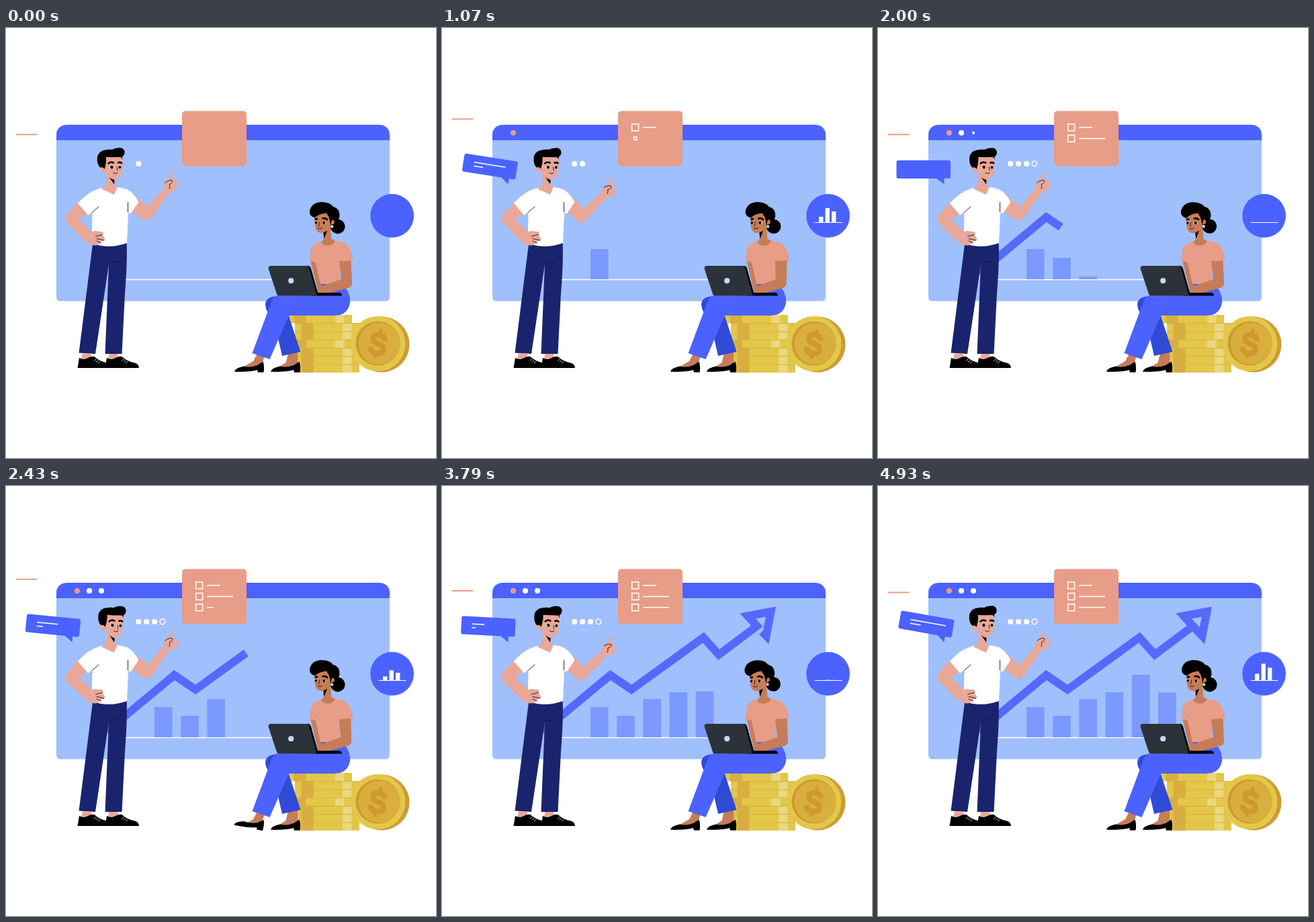
An HTML page that plays this animation: 640x640 px, repeating every 5 s.

```html
<!DOCTYPE html>
<html lang="en">
<head>
<meta charset="utf-8">
<title>Growth presentation</title>
<style>
html, body { margin: 0; width: 100%; height: 100%; overflow: hidden; background: #fff; }
svg { display: block; width: 100vw; height: 100vh; }
.ln { fill: none; stroke: #fff; stroke-width: 1.5; }
.ink { fill: none; stroke: #16161c; stroke-width: .9; stroke-linecap: round; }
.brow { fill: none; stroke: #000; stroke-width: 2.6; stroke-linecap: round; }
.blue { fill: #4c62ff; }
.skin { fill: #e9a798; }
.tan { fill: #c67c58; }
.white { fill: #fff; }
.pink { fill: #e79d87; }
</style>
</head>
<body>
<svg viewBox="0 0 640 640">
  <defs>
    <path id="pump" d="M340 511.5Q341 506 354 503.5Q364 506 374 502L382.500 496.500Q385 503 383.500 512.500H375L374 509Q361 512.500 340 511.500Z"/>
  </defs>

  <!-- window -->
  <rect x="75" y="150" width="496" height="256.500" rx="5.500" fill="#a0bffd"/>
  <path class="blue" d="M75 167V161Q75 144 92 144H554Q571 144 571 161V167Z"/>
  <path class="ln" d="M170 374.500H400"/>
  <g id="bars" fill="#7b99fe"></g>
  <path id="arrow" fill="none" stroke="#5669fd" stroke-width="12" stroke-miterlimit="6"
    d="M150 365L250.500 281.500L282 303L389 225.500L412 251L468.700 208.500L455 193.500L489.500 187L482.500 223L468.700 208.500"/>
  <g id="dots"></g>
  <rect class="pink" x="262" y="123.500" width="96" height="82" rx="5"/>
  <g id="list"></g>

  <circle class="blue" cx="574.600" cy="279.500" r="32.400"/>
  <g id="mini" class="white"></g>

  <path id="dash" stroke="#e79d87" stroke-width="2" d="M14.500 0H46.500"/>
  <g id="bubble">
    <path class="blue" d="M30.500 197H105Q108 197 108 200V221Q108 224 105 224H98.500V232.500L87 224H30.500Q27.500 224 27.500 221V200Q27.500 197 30.500 197Z"/>
    <path id="speech" class="ln"/>
  </g>

  <!-- coins -->
  <g id="stack"></g>
  <circle cx="559" cy="471" r="41.500" fill="#d09a35"/>
  <circle cx="553.500" cy="470" r="41" fill="#e2c748"/>
  <circle cx="553.500" cy="469.500" r="33" fill="#cf9832"/>
  <circle cx="555.500" cy="470" r="31" fill="#d8af3c"/>
  <g fill="none" stroke="#cf9832" transform="rotate(8 553.500 470)">
    <path stroke-width="8" d="M563 464Q562 456.500 554 456.500Q545 456.500 545 463Q545 468.500 554 470Q563 472 563 478Q563 484.500 553.500 484.500Q544 484.500 543.500 476"/>
    <path stroke-width="5" d="M555 447.500V457M552.500 484V492.500"/>
  </g>

  <!-- man -->
  <g id="manArm">
    <path class="skin" d="M180 268L204 284.500Q213 288.500 218 281L244 243L235 238L211 266L194 252Z"/>
    <path class="skin" d="M234 241L236.500 229L241.500 224L245.500 217Q248 214.500 249 217.500L246.500 226L253 227.500Q257.500 232 255.500 237Q250 243.500 241.500 244.500Z"/>
    <path class="ink" d="M237 230Q243 226 247 226.500Q250 229 243 233Q245 235 243 239"/>
  </g>
  <path class="skin" d="M107 260L89.500 279.500Q86 285 90 290L119 318.500L129 304L108 284.500L124 276Z"/>
  <path fill="#1a246e" d="M129.500 318H179.500Q181 345 177 395L172.500 485H147.500L153 352L133 485L108.500 483.500Z"/>
  <path class="ink" d="M154 349.500L168 347.500"/>
  <path class="skin" d="M114 484.500H127L126 496H111ZM153.500 485H166.500L165 496H151Z"/>
  <g id="shoes"></g>
  <path class="white" d="M148 237Q139 238 132 241.500Q119 247 107 261L122 278.500L128.500 274L128 300L129.500 321Q154 329.500 180 320L182 275.500L186 276L197.500 259Q190 245 180 240Q173 237.500 166 237Z"/>
  <path class="skin" d="M150.500 220L148.500 235L142 239.500L161 248L165.500 237.500L161 233V222Z"/>
  <path class="ink" d="M138 266L128 274.500M181.500 259.500V274"/>
  <path class="skin" d="M119.500 318Q119.500 306 132 302L142 303Q147 305 143.500 307.500L147 313Q148 317 142 317.500Q140 322 134 323.500Q126 324 119.500 318Z"/>
  <path class="ink" d="M133.500 310L143.500 307.500M135 313.500L146 316M135 317L141.500 320"/>
  <g id="manHead">
    <path d="M153 221L161.500 225L161 232.500Z"/>
    <path class="skin" d="M147 188H171.500Q174.500 203 171.500 217Q168 225.500 161 226Q153 224 148 215Q140 217 139.500 210Q140 204 147 206Z"/>
    <path d="M140.500 208Q134.500 203 136 191Q139 182.500 148 181.500Q154 180.500 158 181Q164 177.500 172 178.500Q177.500 181 176.500 186.500Q175.500 190.500 173 191.500L173.500 196Q172 192 169 192Q158 192.500 149 192Q149.500 202 146.500 210Q144 206 140.500 208Z"/>
    <path class="brow" d="M152.500 201.500Q156 198.500 160 200.500M167 200.500Q170 199 172 201"/>
    <path class="ink" d="M165 207L166 212M159.500 215.500Q162.500 218 166 215.500"/>
    <g id="manOpen">
      <path class="white" d="M153.500 208Q156 204 160 207.500Q156 211 153.500 208ZM166.500 207.500Q169 204 171.500 207.500Q169 211 166.500 207.500Z"/>
      <circle cx="157.300" cy="207.300" r="2.200"/><circle cx="169.300" cy="207.300" r="2"/>
    </g>
    <path id="manShut" class="ink" d="M154 208Q157 210 160 208.500M167 208.500Q169 210 172 208"/>
  </g>

  <!-- woman -->
  <path class="tan" d="M374 484L368 496L354 504L372 507L381 500L385 488ZM420 484L416.500 498L407 504L425 507L434 500V482Z"/>
  <use id="shoe" href="#pump"/>
  <use href="#pump" x="54"/>
  <path fill="#304ad8" d="M404 399Q386 400 386 412Q387 424 398 432L411 488L438.500 482L420 426Z"/>
  <path class="blue" d="M402 398.500L466 398L468 380H496L506 388Q513 398 512 409Q509 427 490 428H421L392.500 493L366.500 484L396 405Q398 400 402 398.500Z"/>
  <path class="tan" d="M453 345L464.500 393L470 381L461 345Z"/>
  <path class="tan" d="M473 300L472.500 316L466 320Q470 328 480 327L492 318L484.500 314L483 295Z"/>
  <path class="pink" d="M469 317.500Q456 320 453.500 330L451.500 346.500L460.500 348.500L468 381H497V347.500L516.500 346Q515 328 504 320Q496 317 490 316.500Q487 324 479 324Q470 323.500 469 317.500Z"/>
  <path id="womanArm" class="tan"/>
  <g id="womanHead">
    <circle cx="493.800" cy="295.500" r="10.700"/>
    <path d="M472 302L478 302L473.500 313.500Z"/>
    <path class="tan" d="M460 277Q458.500 290 461 300Q465 306.500 473 304.500Q481 301 483.500 293Q490 292 489.500 286L480 272Z"/>
    <path d="M452 272Q455 260 469 259Q482 259 487 266Q497 268.500 496.500 280Q495 289 489 289Q488 284 485 286L483 294Q482 284 480 280Q478 279 477.500 275.500Q466 276 460 282.500Q451 280 452 272Z"/>
    <path class="brow" d="M460.500 284.500L463 284M471.500 283.500Q474.500 282 478 285"/>
    <path class="ink" d="M466.500 289L465.500 295M464.500 298Q467.500 300 470.500 297.500"/>
    <circle class="white" cx="485.300" cy="295.500" r="2"/>
    <g id="womanOpen">
      <path class="white" d="M459.500 290.500Q462 287 464 290.500Q462 293 459.500 290.500ZM471 290.500Q474 286.500 477 290Q474 293.500 471 290.500Z"/>
      <circle cx="461.500" cy="290" r="1.800"/><circle cx="473.500" cy="290" r="2"/>
    </g>
    <path id="womanShut" class="ink" d="M460 290.500Q462 292 464 290.500M471 291Q474 292.500 477 290"/>
  </g>
  <path d="M446 354H450Q453 354.500 454 358L464 394H497Q500 395 500 398.500H455Z"/>
  <path fill="#2c323a" d="M394 354H446Q450 354 451 357L462.500 398.500H406Q404 398.500 403 396L390.500 358Q390.500 354 394 354Z"/>
  <circle cx="424.200" cy="376.200" r="4.100" fill="#c5d9ff"/>
</svg>
<script>
const LOOP = 5000, BEAT = 770;
const $ = id => document.getElementById(id);
const clamp = u => Math.max(0, Math.min(1, u));
const ease = u => (1 - Math.cos(Math.PI * clamp(u))) / 2;
const grow = (t, start, len) => ease((t - start) / len);

// eases up to 1 at each peak and back down to 0
const pulse = (t, up, down, ...peaks) =>
  Math.max(...peaks.map(p => ease(1 - (t < p ? (p - t) / up : (t - p) / down))));

const set = (el, attrs) => { for (const k in attrs) el.setAttribute(k, attrs[k]); };
const show = (el, on) => set(el, { visibility: on ? "visible" : "hidden" });
const turn = (id, a, x, y) => set($(id), { transform: `rotate(${a} ${x} ${y})` });

function add(parent, tag, attrs) {
  const el = document.createElementNS("http://www.w3.org/2000/svg", tag);
  set(el, attrs);
  return $(parent).appendChild(el);
}

// a row of bars that rise from a base line
const columns = (parent, heights, x, step, width) => heights.map((h, i) =>
  ({ h, el: add(parent, "rect", { x: x + i * step, width }) }));

const raise = (bar, base, k) => set(bar.el, { y: base - bar.h * k, height: bar.h * k });

const bars = columns("bars", [45, 32, 57, 67, 93, 66.5], 221, 39.2, 26.6);
const minis = columns("mini", [10, 25, 19], 561, 9.5, 6.4);
const miniBase = add("mini", "rect", { x: 554.5, y: 289, height: 1 });

const dots = [];
function dotRow(x, y, step, first, fills) {
  fills.forEach((fill, i) => {
    const ring = fill === "none";
    const el = add("dots", "circle", { cx: x + i * step, cy: y, fill, stroke: ring ? "#fff" : "none", "stroke-width": 1.5 });
    dots.push({ el, r: ring ? 3.9 : 4.1, start: first + i * BEAT });
  });
}
dotRow(106, 156, 18, 350, ["#e79d87", "#fff", "#fff"]);
dotRow(197.3, 202, 11.9, -500, ["#fff", "#fff", "#fff", "none"]);

const rows = [0, 1, 2].map(i => ({
  y: 148 + i * 16.4,
  start: 200 + 600 * i + 180 * i * i,
  width: i ? 39 : 20,
  el: add("list", "path", { class: "ln" })
}));

// coin pile: the lower kind sits a little to the right
[..."ABBABBB"].forEach((kind, i) => {
  const x = kind === "A" ? 419 : 430, y = 427 + i * 12.25;
  const part = (dx, width, fill) => add("stack", "rect", { x: x + dx, y, width, height: 12.3, fill });
  part(0, 96, "#e2c748");
  part(9.5, 18, "#d8ae40");
  part(71, 13.5, "#ead77e");
  if (i) part(0, 96, "#d2ac3f").setAttribute("height", .9);
});

for (const x of [0, 41]) {
  const g = { transform: `translate(${x} 0)` };
  add("shoes", "path", { ...g, d: "M106.5 506L109 491Q116 494.500 121 491.500Q128 487.500 132 489.500Q140 496.500 151 498.500Q157 500.500 157 506Z" });
  for (let i = 0; i < 3; i++)
    add("shoes", "path", { ...g, d: `M${131 + 3 * i} ${495.5 + 1.8 * i}l3.5 -3.200`, stroke: "#fff", "stroke-width": .8 });
}

const arrow = $("arrow"), SHAFT = 406, HEAD = arrow.getTotalLength() - SHAFT;

function drawArrow(t) {
  const shaft = clamp((t - 1150) / 1820) ** 1.25;
  const head = 1 - (1 - clamp((t - 2970) / 1200)) ** 2;
  set(arrow, { "stroke-dasharray": `${SHAFT * shaft + HEAD * head} 999` });
  show(arrow, shaft > 0);
}

function drawCharts(t) {
  bars.forEach((b, i) => raise(b, 374, grow(t, 370 + i * BEAT, 520)));
  const k = Math.max(pulse(t, 740, 700, 1250, 2750), grow(t, 3700, 760));
  minis.forEach(m => raise(m, 289.5, k));
  set(miniBase, { width: 41 * grow(t, 70, 500) });
}

function drawMarks(t) {
  for (const d of dots) {
    const s = grow(t, d.start, 220);
    set(d.el, { r: d.r * s });
    show(d.el, s > 0);
  }
  for (const r of rows) {
    const k = 10 * grow(t, r.start, 200), w = r.width * grow(t, r.start + 200, 330);
    set(r.el, { d: `M${287.6 - k / 2} ${r.y - k / 2}h${k}v${k}h${-k}z` + (w ? `M299 ${r.y}h${w}` : "") });
    show(r.el, k > 0);
  }
  set($("dash"), { transform: `translate(0 ${158.5 - 46.5 * pulse(t, 820, 380, 880, 2880, 4490)})` });
}

function drawBubble(t) {
  const talk = Math.max(pulse(t, 720, 720, 1225, 2750), grow(t, 3510, 700));
  const size = grow(t, 300, 240);
  set($("bubble"), {
    transform: `translate(98 232) rotate(${Math.max(0, 11 * (talk - .08))}) scale(${size}) translate(-98 -232)`
  });
  show($("bubble"), size > 0);
  set($("speech"), { d: `M43.5 208h${53 * talk}M43.5 213.500h${16 * talk}` });
}

function drawPeople(t) {
  turn("manArm", 9 * pulse(t, 850, 1250, 800, 3600), 188, 262);
  turn("manHead", 2.4 * pulse(t, 600, 700, 700, 2430, 3850), 155, 232);
  turn("womanHead", -4 * pulse(t, 650, 750, 1570, 4100), 478, 315);
  turn("shoe", 10 * pulse(t, 350, 400, 600, 2400, 3400, 4250), 380, 503);

  const e = -2.8 * pulse(t, 750, 1000, 800, 2900);
  set($("womanArm"), {
    d: `M496 347L${499 + e} 374L467 385Q462 389 464 395H478L${509 + e} 387Q${516 + e} 385 ${515 + e} 377L513.500 346Z`
  });

  const shut = t > 590 && (t - 590) % 2040 < 120;
  for (const who of ["man", "woman"]) {
    show($(who + "Open"), !shut);
    show($(who + "Shut"), shut);
  }
}

function draw(t) {
  for (const part of [drawCharts, drawArrow, drawMarks, drawBubble, drawPeople]) part(t);
}

const began = performance.now();
function tick() {
  draw((performance.now() - began) % LOOP);
  requestAnimationFrame(tick);
}
draw(0);
requestAnimationFrame(tick);
</script>
</body>
</html>
```
